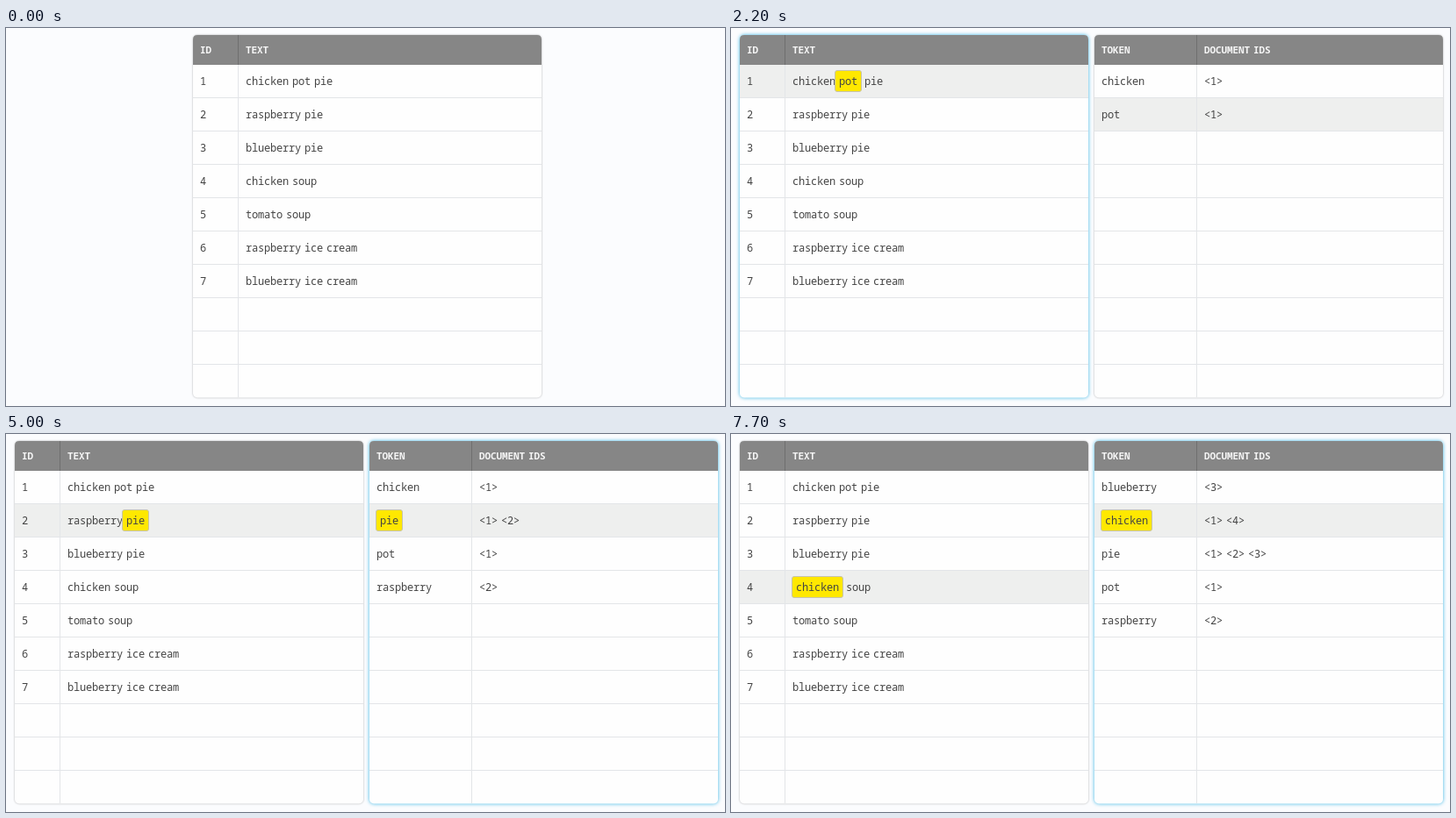
Write an HTML page that moves like this. It is 819 px wide and 431 px high and loops after 8000 ms.

```html
<!DOCTYPE html>
<html lang="en">
<head>
<meta charset="utf-8">
<title>Inverted index</title>
<style>
html, body { margin: 0; width: 100%; height: 100%; overflow: hidden; background: #fbfcfe; }
svg { display: block; width: 100%; height: 100%; }
text { font: 12px "Noto Sans Mono", "DejaVu Sans Mono", monospace; letter-spacing: -.2px; fill: #444; }
.head { font-size: 11px; font-weight: 600; letter-spacing: -.1px; fill: #f6f6f6; }
.card { fill: #fefefe; filter: drop-shadow(0 0 1.3px rgba(0, 0, 0, .3)); }
.card.glow { filter: drop-shadow(0 0 2px #36b4e4); }
.bar { fill: #868686; }
.row { fill: #eeefee; }
.line { fill: #e3e5e8; }
.split { fill: #6f6f6f; }
.mark { fill: #ffe800; stroke: #c6c3ac; }
</style>
</head>
<body>
<svg id="stage" viewBox="0 0 819 431"></svg>
<script>
const LOOP = 8000, WIDTH = 397, TOP = 8, BODY = 42, PITCH = 38, ROWS = 10;
const CHAR = 7, HEAD_CHAR = 6.5, SPACE = 4, PAD = 4;
const docs = ["chicken pot pie", "raspberry pie", "blueberry pie", "chicken soup",
  "tomato soup", "raspberry ice cream", "blueberry ice cream"].map(s => s.split(" "));

// time, document, word, stage (0 read the word, 1 find the token, 2 mark the id)
const steps = [
  [1400, 1, 0, 0], [1500, 1, 0, 1], [1700, 1, 0, 2], [2200, 1, 1, 0], [2600, 1, 1, 2],
  [2900, 1, 2, 0], [3300, 1, 2, 2], [3800, 2, 0, 0], [4100, 2, 0, 1], [4400, 2, 0, 2],
  [5000, 2, 1, 1], [5300, 2, 1, 2], [5600, 3, 0, 0], [6000, 3, 0, 2], [6500, 3, 1, 0],
  [6800, 3, 1, 1], [7200, 3, 1, 2], [7700, 4, 0, 1]
];

const stage = document.getElementById("stage");
const swing = (t, from, to) => {
  const p = Math.min(1, Math.max(0, (t - from) / (to - from)));
  return .5 - Math.cos(p * Math.PI) / 2;
};
const rect = (cls, x, y, w, h, r = 0) =>
  `<rect class="${cls}" x="${x}" y="${y}" width="${w}" height="${h}" rx="${r}"/>`;
const label = (s, x, y, cls = "") =>
  `<text class="${cls}" x="${x}" y="${y}">${s.replace(/</g, "&lt;")}</text>`;

// A marked word gets padding, and takes the place of the space before it.
function line(words, x, top, marked = -1) {
  let out = "";
  words.forEach((word, i) => {
    const w = word.length * CHAR;
    if (i === marked) {
      out += rect("mark", x - .5, top + 6.5, w + 2 * PAD + 1, 24, 2.5) + label(word, x + PAD, top + 23);
      x += w + 2 * PAD;
    } else {
      if (i) x += SPACE;
      out += label(word, x, top + 23);
      x += w;
    }
  });
  return out;
}

function heading(s, x) {
  return s.split(" ").map(word => {
    const out = label(word, x, 29, "head");
    x += word.length * HEAD_CHAR + SPACE;
    return out;
  }).join("");
}

// rows: [first cell, second cell, marked word in first, marked word in second]
function table(x, split, heads, rows, active, glow, opacity = 1) {
  let out = rect("card" + (glow ? " glow" : ""), 0, TOP, WIDTH, 413.5, 5);
  out += `<path class="bar" d="M0 42V13q0-5 5-5H${WIDTH - 5}q5 0 5 5V42z"/>`;
  if (active >= 0) out += rect("row", 0, BODY + active * PITCH, WIDTH, PITCH);
  for (let i = 1; i < ROWS; i++) out += rect("line", 0, BODY + i * PITCH - 1, WIDTH, 1);
  out += rect("line", split, BODY, 1, 379) + rect("split", split, TOP, 1, BODY - TOP);
  out += heading(heads[0], 8) + heading(heads[1], split + 9);
  rows.forEach(([a, b, markA, markB], i) => {
    const top = BODY + i * PITCH;
    out += line(a, 8, top, markA) + line(b, split + 9, top, markB);
  });
  return `<g transform="translate(${x})" opacity="${opacity}">${out}</g>`;
}

function buildIndex(doc, word) {
  const index = {};
  for (let d = 1; d <= doc; d++) {
    docs[d - 1].forEach((token, i) => {
      if (d < doc || i <= word) (index[token] ||= []).push(`<${d}>`);
    });
  }
  return index;
}

function draw(t) {
  const [, doc, word, phase] = steps.findLast(s => s[0] <= t) || [0, 0, -1, -1];
  const token = doc ? docs[doc - 1][word] : "";
  const index = buildIndex(doc, word);
  const tokens = Object.keys(index).sort();

  const left = docs.map((words, i) => [[String(i + 1)], words, -1, i === doc - 1 ? word : -1]);
  const right = tokens.map(name => {
    const ids = index[name], hit = name === token;
    return [[name], ids, hit && phase > 0 ? 0 : -1, hit && phase > 1 ? ids.length - 1 : -1];
  });

  const x = Math.round(213 - 203 * swing(t, 400, 900));
  const fade = swing(t, 650, 1300);
  stage.innerHTML = table(x, 51, ["ID", "TEXT"], left, doc - 1, phase === 0) +
    (fade ? table(414, 116, ["TOKEN", "DOCUMENT IDS"], right, tokens.indexOf(token), phase > 0, fade) : "");
}

let last = -1;
function tick() {
  const t = Math.floor(performance.now() % LOOP / 100) * 100;
  if (t !== last) draw(last = t);
  requestAnimationFrame(tick);
}
tick();
</script>
</body>
</html>
```
